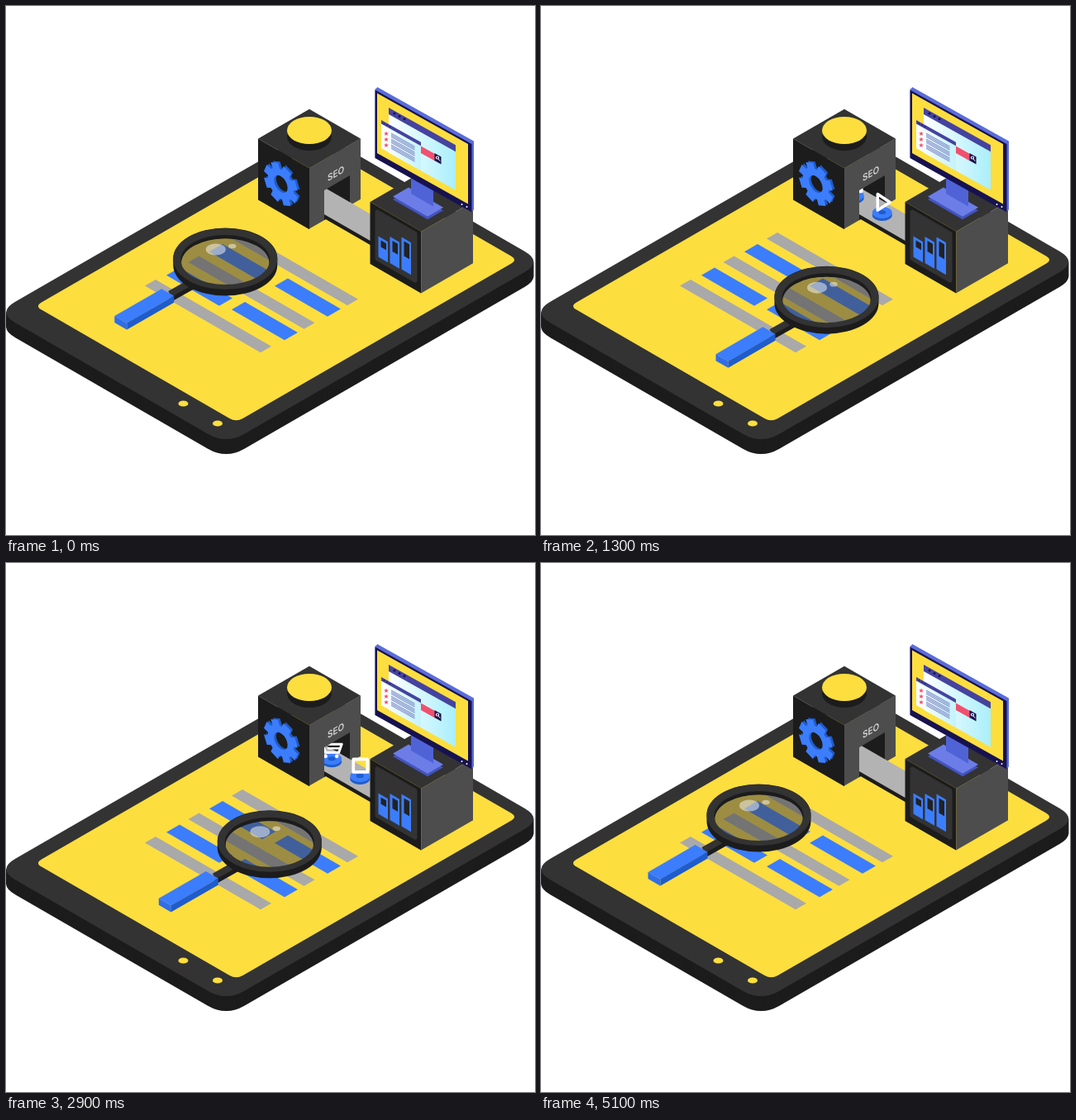
Animation of 640 by 640 pixels, one loop 5.2 s. Source, as an HTML page with a canvas:

```html
<!DOCTYPE html>
<html>
<head>
<meta charset="utf-8">
<style>
  html, body { margin: 0; width: 100%; height: 100%; overflow: hidden; background: #fff; }
  canvas { display: block; }
</style>
</head>
<body>
<canvas id="stage" width="640" height="640"></canvas>
<script>
const c = document.getElementById('stage').getContext('2d');
const K = 0.577, LOOP = 5200, STEP = 100;
const YELLOW = '#fdde3f', BLUE = '#3c7dfc', DEEP = '#1f5ccc', GREY = '#a9a9a9';
const BLACK = '#1c1c1c', DARK = '#333', MID = '#4d4d4d';
const NAVY = '#17124f', VIOLET = '#5b6dd9', INDIGO = '#4543a0', PINK = '#f0506e';

const times = (n, fn) => Array.from({ length: n }, (_, i) => fn(i));

function trace(pts) {
  c.beginPath();
  pts.forEach(([x, y]) => c.lineTo(x, y));
}

function shape(color, pts) {
  trace(pts);
  c.fillStyle = color;
  c.fill();
}

function line(color, width, pts, closed) {
  trace(pts);
  if (closed) c.closePath();
  c.strokeStyle = color;
  c.lineWidth = width;
  c.stroke();
}

function oval(color, x, y, rx, ry = rx) {
  c.beginPath();
  c.ellipse(x, y, rx, ry, 0, 0, 7);
  c.fillStyle = color;
  c.fill();
}

// Vertical face; dir 1 falls to the right, -1 rises
function wall(color, x, y, w, h, dir = 1) {
  const d = w * K * dir;
  shape(color, [[x, y], [x + w, y + d], [x + w, y + d + h], [x, y + h]]);
}

// Horizontal face from its left corner: a runs down-right, b up-right
const corners = (x, y, a, b) =>
  [[x, y], [x + a, y + a * K], [x + a + b, y + (a - b) * K], [x + b, y - b * K]];
const tile = (color, ...box) => shape(color, corners(...box));

function roundTile(color, r, ...box) {
  const pts = corners(...box);
  const toward = ([x, y], [u, v]) => [x + r * Math.sign(u - x), y + r * K * Math.sign(v - y)];
  c.beginPath();
  pts.forEach((p, i) => {
    c.lineTo(...toward(p, pts[(i + 3) % 4]));
    c.quadraticCurveTo(...p, ...toward(p, pts[(i + 1) % 4]));
  });
  c.fillStyle = color;
  c.fill();
}

function tablet() {
  for (let dy = 18; dy >= 0; dy--)
    roundTile(dy ? BLACK : DARK, 22, -10.7, 370.5 + dy, 277, 383);
  roundTile(YELLOW, 8, 35, 363, 243.5, 340.5);
  times(2, i => oval(YELLOW, 214.5 + i * 41.5, 481 + i * 24, 6, 3.6));
  times(3, i => tile(GREY, 168 + i * 52.5, 338.5 - i * 28.5, 140, 13));
  times(4, i => {
    const row = i >> 1, col = i % 2;
    tile(BLUE, 194 + row * 52 + col * 79, 325.7 - row * 28.5 + col * 41.5, 64, 16);
  });
}

function gear(color, x, y) {
  c.save();
  c.transform(0.866, 0.5, 0, 1, x, y);
  trace(times(32, i => {
    const a = Math.floor(i / 4) * Math.PI / 4 + Math.PI / 8 + [-0.3, -0.23, 0.23, 0.3][i % 4];
    const r = i % 4 % 3 ? 24 : 18;
    return [r * Math.cos(a), r * Math.sin(a)];
  }));
  c.closePath();
  c.moveTo(9.5, 0);
  c.arc(0, 0, 9.5, 0, 7);
  c.fillStyle = color;
  c.fill('evenodd');
  c.restore();
}

function machine() {
  tile(DARK, 305, 160.5, 62, 62);
  wall(BLACK, 305, 160.5, 62, 74);
  wall(MID, 367, 196, 62, 73.5, -1);
  oval(BLACK, 367, 158, 27, 17);
  oval(YELLOW, 367, 150.5, 27, 16.5);
  gear(DEEP, 335, 214);
  gear(BLUE, 332.5, 215.5);
  wall(BLACK, 385, 223, 31, 36, -1);
  c.save();
  c.transform(0.866, -0.5, 0, 1, 389, 212.5);
  c.fillStyle = '#d4d4d4';
  c.font = '600 11.5px Inter, sans-serif';
  c.fillText('SEO', 0, 0);
  c.restore();
}

function cabinet() {
  tile(DARK, 440.5, 237, 62, 62);
  wall(BLACK, 440.5, 237, 62, 75);
  wall(MID, 502.5, 272.8, 62.5, 74.5, -1);
  const panel = [[449, 249], [495, 275.5], [495, 332], [449, 305.5]];
  line(DARK, 5, panel, true);
  shape(DARK, panel);
  times(3, i => {
    const x = 450.5 + i * 14, y = 278.5 + i * 0.5;
    wall(BLUE, x, y, 11.5, 25 + i * 7);
    wall('#222', x + 3, y + 5, 6.5, 8 + i * 5);
  });
}

function fade(x, w, from, to) {
  const g = c.createLinearGradient(x, 0, x + w, 0);
  g.addColorStop(0, from);
  g.addColorStop(1, to);
  return g;
}

function star(x, y) {
  shape(PINK, times(10, i => {
    const a = i * Math.PI / 5 - Math.PI / 2, r = i % 2 ? 1.3 : 3;
    return [x + r * Math.cos(a), y + r * Math.sin(a)];
  }));
}

function monitor() {
  tile('#4454bd', 468, 234, 42, 19);
  tile('#6c7de8', 468, 230.5, 42, 19);
  wall('#4f63d6', 490, 207, 27, 20);

  // The screen falls a little less steeply than the floor
  const pane = (color, x, y, w, h) => wall(color, x, y, w, h, 0.97);
  times(4, i => pane(VIOLET, 449 - i * 0.8, 98 + i * 0.7, 117, 83.5));
  pane(NAVY, 446.5, 101.5, 117, 82.5);
  pane(YELLOW, 449, 105.5, 110, 72.5);
  times(2, i => oval('#fff', 551.5 + i * 6, 240 + i * 3, 1));

  pane(fade(463, 81, '#fff', '#a9effb'), 463, 130, 81, 47.5);
  pane(INDIGO, 463, 123, 81, 8);
  pane(fade(454, 48, '#fff', '#c4f3fc'), 454, 142, 48, 30);
  pane(INDIGO, 454, 138, 48, 4.5);
  times(3, i => {
    oval(NAVY, 470 + i * 6, 130 + i * 3.4, 1.5);
    oval(NAVY, 457.5 + i * 3.5, 142 + i * 2, 0.8);
    star(460, 154.5 + i * 7);
    times(3, k => pane('#8590ca', 466, 153.5 + i * 7 + k * 2, 28.5, 1.3));
  });
  pane(PINK, 502, 169.5, 17, 8.5);
  pane(NAVY, 518.5, 178, 8, 9);
  line('#fff', 1, [[523, 184.8], [525, 187.5]]);
  oval('#fff', 522, 183.5, 2.1);
  oval(NAVY, 522, 183.5, 1.1);
}

function disc() {
  oval(DEEP, 0, 2.5, 12, 7);
  oval(BLUE, 0, -0.5, 12, 7);
  oval(DEEP, 0, -1, 4.5, 2.6);
}

const icons = [
  () => line('#fff', 3.5, [[-5.5, -23], [9.5, -13], [-5.5, -3.5]], true),
  () => {
    c.strokeStyle = '#fff';
    c.lineWidth = 3.7;
    c.strokeRect(-8, -21, 17, 15.5);
  },
  () => {
    line('#fff', 3, [[-18.5, -24], [-13, -22.5], [-7.5, -8.5], [8.5, -8.5], [12, -18.5], [-5, -18.5]]);
    line('#fff', 2.6, [[-4, -13.5], [9, -13.5]]);
    times(2, i => oval('#fff', -7.5 + i * 13.5, -4, 2.2));
  }
];

// Belt and goods show only through the doorway and to the right of it
function belt(t) {
  c.save();
  trace([[385, 223], [416, 205], [441, 205], [441, 300], [385, 300]]);
  c.clip();
  wall(BLACK, 385, 240, 56, 17);
  wall('#b3b3b3', 385, 219.5, 56, 32.5);
  c.lineCap = 'round';
  icons.forEach((icon, i) => {
    const run = (t - 630 - i * 1100) * 0.031;
    if (run < -30 || run > 75) return;
    c.save();
    c.translate(392 + run, 238.5 - i + run * K);
    disc();
    icon();
    c.restore();
  });
  c.restore();
}

// Cubic Bezier easing with control points (.18, 0) and (0, 1)
function ease(u) {
  let lo = 0, hi = 1;
  times(30, () => {
    const s = (lo + hi) / 2;
    if (0.54 * s * (1 - s) ** 2 + s ** 3 < u) lo = s; else hi = s;
  });
  return lo * lo * (3 - 2 * lo);
}

// Filled ring between an outer ellipse stretched down by depth and an inner one
function ring(color, y, depth, innerY, rx, ry) {
  c.beginPath();
  c.ellipse(265, y + depth, 63, 37, 0, 0, Math.PI);
  c.ellipse(265, y, 63, 37, 0, Math.PI, Math.PI * 2);
  c.closePath();
  c.moveTo(265 + rx, innerY);
  c.ellipse(265, innerY, rx, ry, 0, 0, Math.PI * 2);
  c.fillStyle = color;
  c.fill('evenodd');
}

function magnifier(t) {
  const phase = (t + 100) % LOOP / (LOOP / 2);
  const e = ease(phase % 1), x = 91 * (phase < 1 ? e : 1 - e);
  c.save();
  c.translate(x - 1.5, x * 0.575 - 1.5);

  line(BLACK, 9, [[198, 354], [230, 336]]);
  line(DARK, 8, [[198, 349], [228, 332]]);
  tile(BLUE, 131, 375.5, 15, 57);
  wall('#2f6ee8', 131, 375.5, 15, 8);
  wall(DEEP, 146, 384, 57, 8, -1);

  oval('rgba(70,70,70,.53)', 265, 311, 53, 29);
  ring(BLACK, 306, 8, 311, 53, 29);
  ring(DARK, 306.5, 0, 307.5, 54, 30);
  oval('rgba(255,255,255,.48)', 253.5, 295, 12, 7);
  oval('rgba(255,255,255,.48)', 273.5, 291, 4.7, 2.8);
  c.restore();
}

function draw(now) {
  const t = Math.floor(now % LOOP / STEP) * STEP;
  c.clearRect(0, 0, 640, 640);
  c.lineJoin = 'round';
  tablet();
  machine();
  belt(t);
  cabinet();
  monitor();
  magnifier(t);
}

let start;
function tick(now) {
  start ??= now;
  draw(now - start);
  requestAnimationFrame(tick);
}
requestAnimationFrame(tick);
</script>
</body>
</html>
```
